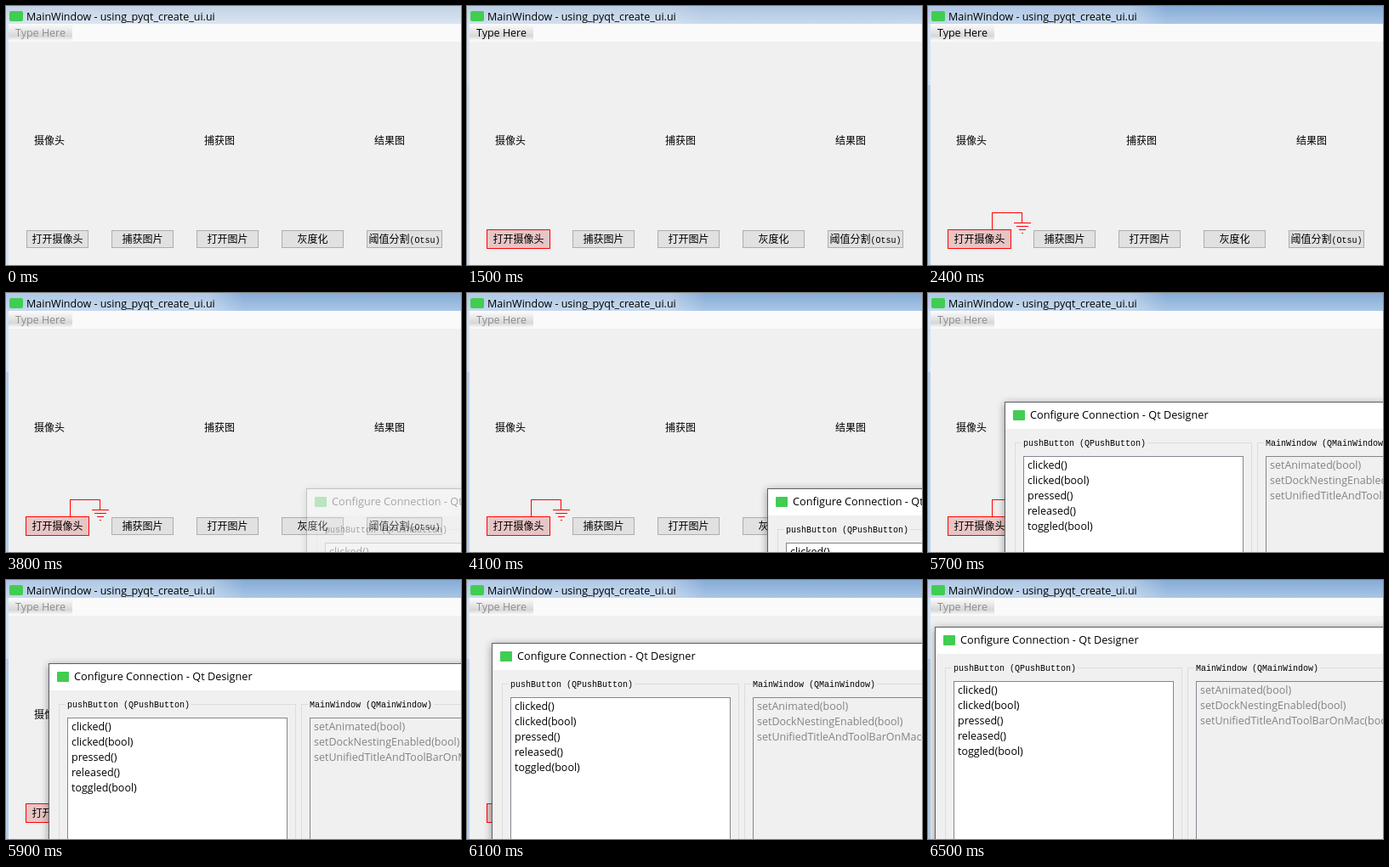
Recreate the animation shown at these times as an HTML page. Size 535 by 305 pixels, loop 8500 ms.

```html
<!DOCTYPE html>
<html lang="zh-CN">
<head>
<meta charset="utf-8">
<title>MainWindow</title>
<style>
  html, body { margin: 0; width: 100%; height: 100%; overflow: hidden; background: #f0f0f0; }
  svg { display: block; width: 535px; height: 305px; }
  text { white-space: pre; }
  .ui { font: 12.5px "Open Sans", "Noto Sans", sans-serif; }
  .caption { font-size: 12.7px; }
  .cjk { font: 12px "Noto Sans CJK SC", "Noto Sans CJK", sans-serif; }
  .mono { font: 10px "Liberation Mono", monospace; }
  .mid { text-anchor: middle; }
  .off { fill: #838383; }
  .crisp, .crisp * { shape-rendering: crispEdges; }
  .btn { fill: #e1e1e1; stroke: #adadad; }
  .line { fill: none; stroke: #f00; }
  #shadow { filter: drop-shadow(0 2px 5px rgba(0, 0, 0, .4)); }
</style>
</head>
<body>
<svg id="stage" viewBox="0 0 535 305">
  <defs>
    <linearGradient id="idle" x2="0" y2="1">
      <stop stop-color="#c3d2e5"/><stop offset="1" stop-color="#dae5f2"/>
    </linearGradient>
    <linearGradient id="active" x2="0" y2="1">
      <stop stop-color="#86abd6"/><stop offset="1" stop-color="#a9c6e6"/>
    </linearGradient>
    <linearGradient id="glow">
      <stop stop-color="#fff" stop-opacity=".34"/>
      <stop offset=".85" stop-color="#fff" stop-opacity=".34"/>
      <stop offset="1" stop-color="#fff" stop-opacity="0"/>
    </linearGradient>
    <linearGradient id="slot" x2="0" y2="1">
      <stop stop-opacity="0"/><stop offset=".7" stop-opacity=".14"/><stop offset="1" stop-opacity="0"/>
    </linearGradient>
  </defs>

  <rect width="535" height="305" fill="#f0f0f0"/>
  <rect width="535" height="21" fill="url(#idle)"/>
  <rect y="21" width="3" height="284" fill="#d7e3f1"/>
  <g id="focus">
    <rect width="535" height="21" fill="url(#active)"/>
    <rect y="21" width="3" height="284" fill="#b7d0eb"/>
    <rect y="21" width="3" height="72" fill="#d3e3f4"/>
    <rect width="280" height="21" fill="url(#glow)"/>
  </g>
  <rect x="4" y="6" width="16" height="12" rx="2" fill="#41cd52"/>
  <text class="ui" x="24" y="17">MainWindow - using_pyqt_create_ui.ui</text>

  <rect x="3" y="21" width="532" height="21" fill="#fafafb"/>
  <rect x="3" y="22" width="75" height="19" fill="url(#slot)"/>
  <text class="ui" id="menu" x="11" y="36">Type Here</text>

  <g id="form"></g>

  <g id="wire" class="crisp">
    <path id="lead" class="line"/>
    <path id="ground" class="line" d="M-10 .5h20M-7 4.5h14M-4 8.5h8M-1 12.5h2"/>
  </g>

  <g id="dialog">
    <rect id="shadow" width="620" height="420" fill="#f0f0f0"/>
    <g class="crisp">
      <rect x=".5" y=".5" width="619" height="419" fill="#f0f0f0" stroke="#5c6268"/>
      <rect x="1" y="1" width="618" height="31" fill="#fff"/>
    </g>
    <rect x="10" y="10" width="14" height="12" rx="1" fill="#41cd52"/>
    <text class="ui caption" x="30" y="20">Configure Connection - Qt Designer</text>
  </g>
</svg>

<script>
const LOOP = 8500;
const $ = id => document.getElementById(id);

function add(parent, tag, attrs, text = '') {
  const el = document.createElementNS('http://www.w3.org/2000/svg', tag);
  for (const k in attrs) el.setAttribute(k, attrs[k]);
  el.textContent = text;
  return parent.appendChild(el);
}

const form = $('form');
['摄像头', '捕获图', '结果图'].forEach((s, i) =>
  add(form, 'text', { class: 'cjk', x: 33 + 200 * i, y: 163 }, s));

const buttons = ['打开摄像头', '捕获图片', '打开图片', '灰度化', '阈值分割'].map((s, i) => {
  const x = 24 + 100 * i, w = i < 4 ? 73 : 89;
  const box = add(form, 'rect', { class: 'btn crisp', x: x + .5, y: 264.5, width: w - 1, height: 20 });
  const label = add(form, 'text', { class: 'cjk mid', x: x + w / 2, y: 279 }, s);
  if (i === 4) add(label, 'tspan', { class: 'mono' }, '(Otsu)');
  return box;
});
const picked = add(form, 'rect', {
  class: 'crisp', x: 23.5, y: 263.5, width: 74, height: 22, fill: '#e8c5c5', stroke: '#f00'
});
buttons[0].after(picked);

function group(x, w, title, rows, enabled) {
  const dlg = $('dialog');
  add(dlg, 'rect', { class: 'crisp', x: x + .5, y: 48.5, width: w, height: 320, fill: 'none', stroke: '#dcdcdc' });
  add(dlg, 'rect', { x: x + 8, y: 44, width: title.length * 6 + 4, height: 10, fill: '#f0f0f0' });
  add(dlg, 'text', { class: 'mono', x: x + 10, y: 52 }, title);
  add(dlg, 'rect', {
    class: 'crisp', x: x + 10.5, y: 64.5, width: w - 20, height: 290,
    fill: enabled ? '#fff' : '#f0f0f0', stroke: '#828790'
  });
  rows.forEach((s, i) =>
    add(dlg, 'text', { class: enabled ? 'ui' : 'ui off', x: x + 15, y: 79 + 18 * i }, s));
}
group(12, 278, 'pushButton (QPushButton)',
  ['clicked()', 'clicked(bool)', 'pressed()', 'released()', 'toggled(bool)'], true);
group(297, 300, 'MainWindow (QMainWindow)',
  ['setAnimated(bool)', 'setDockNestingEnabled(bool)', 'setUnifiedTitleAndToolBarOnMac(bool)'], false);

// Values change in 100 ms ticks; hold the last one reached.
const tick = (t, start, list) => list[Math.min(Math.floor((t - start) / 100), list.length - 1)];

const wirePath = [[83, 269], [91, 266], [98, 262], [104, 259], [109, 256], [111, 255]];
const drag = [[303, 216], [240, 192], [181, 168], [130, 146], [90, 128],
              [68, 113], [50, 98], [37, 85], [29, 74],
              [23, 69], [17, 64], [12, 59], [8, 55]];

function draw(t) {
  picked.style.display = t >= 900 ? '' : 'none';
  $('focus').style.opacity = t < 1500 ? 0 : tick(t, 1500, [.35, .7, 1]);
  $('menu').style.fill = t >= 1500 && t < 3800 ? '#000' : '#8e8e8e';

  const wired = t >= 1900;
  $('wire').style.display = wired ? '' : 'none';
  if (wired) {
    const [x, y] = tick(t, 1900, wirePath);
    $('lead').setAttribute('d', `M75.5 263V${y - 11.5}H${x - .5}V${y}`);
    $('ground').setAttribute('transform', `translate(${x} ${y})`);
  }

  const open = t >= 3800;
  $('dialog').style.display = open ? '' : 'none';
  if (open) {
    const [x, y] = t < 5300 ? [353, 230] : tick(t, 5300, drag);
    $('dialog').setAttribute('transform', `translate(${x} ${y})`);
    $('dialog').style.opacity = tick(t, 3800, [.3, .6, .85, 1]);
  }
}

const start = performance.now();
function frame() {
  draw((performance.now() - start) % LOOP);
  requestAnimationFrame(frame);
}
frame();
</script>
</body>
</html>
```
